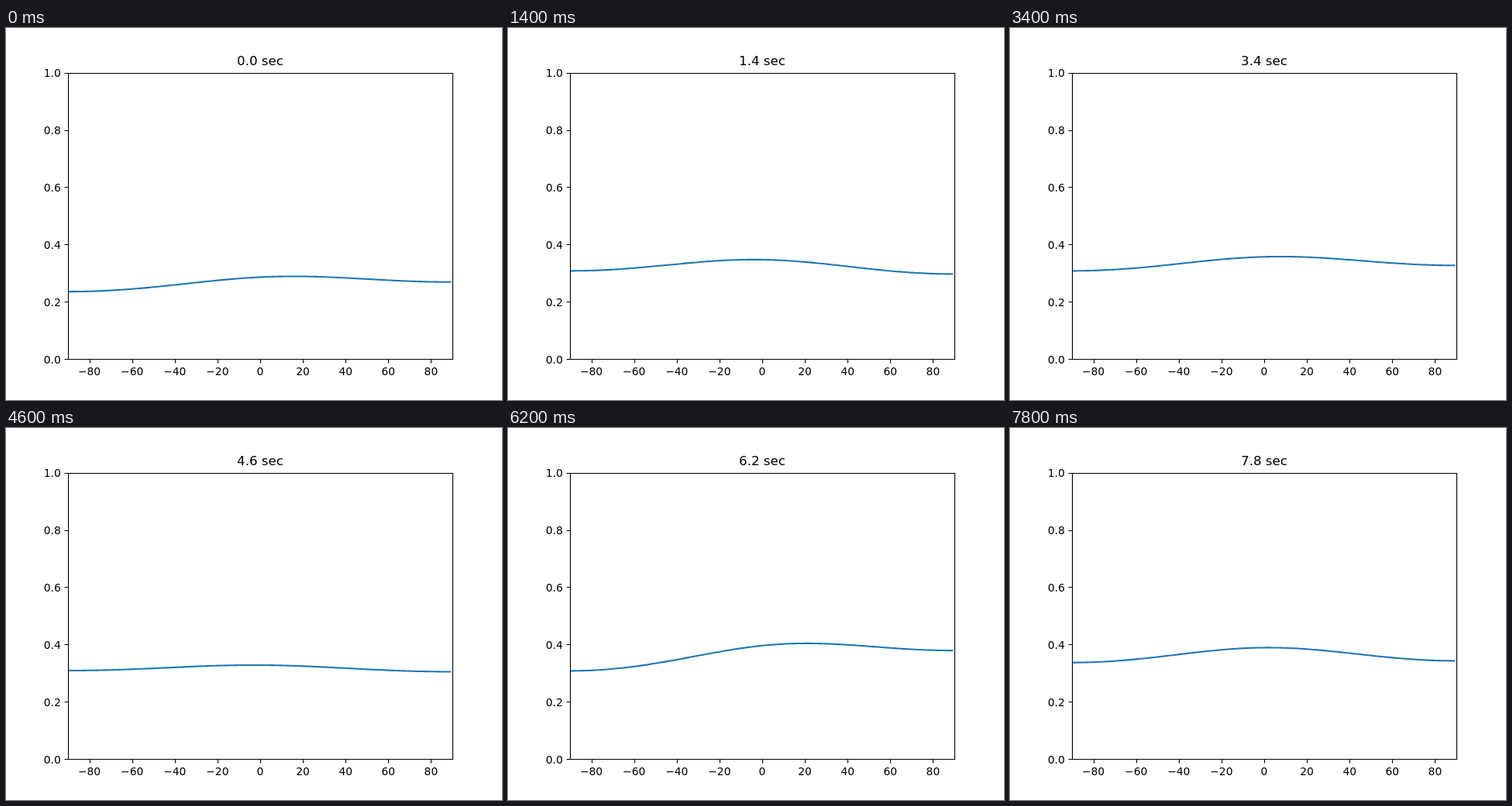
An HTML page with a canvas for the animation above (8000 ms loop, 640 by 480 pixels).

```html
<!DOCTYPE html>
<html lang="en">
<head>
<meta charset="utf-8">
<title>Curve over time</title>
<style>
  html, body { margin: 0; width: 100%; height: 100%; overflow: hidden; background: #fff; }
  canvas { display: block; }
</style>
</head>
<body>
<canvas id="plot" width="640" height="480"></canvas>
<script>
const ctx = document.getElementById('plot').getContext('2d');
const LOOP = 8000, STEP = 200;
const LEFT = 80, RIGHT = 576, TOP = 57.6, BOTTOM = 427.2;
const BEND = 1.1;

// Key poses: seconds, then the curve's height at its left end, middle and right end
const POSES = [
  [0, 0.2355, 0.286, 0.269],
  [1.4, 0.308, 0.347, 0.297],
  [2.6, 0.3285, 0.389, 0.341],
  [3.4, 0.308, 0.357, 0.327],
  [4.6, 0.309, 0.328, 0.305],
  [6.2, 0.308, 0.396, 0.379],
  [7.8, 0.337, 0.389, 0.343]
];

const toX = angle => LEFT + (angle + 90) / 180 * (RIGHT - LEFT);
const toY = value => BOTTOM - value * (BOTTOM - TOP);
const crisp = v => Math.round(v) + 0.5;

function poseAt(seconds) {
  const next = Math.max(1, POSES.findIndex(pose => pose[0] >= seconds));
  const [a, b] = [POSES[next - 1], POSES[next]];
  const mix = (seconds - a[0]) / (b[0] - a[0]);
  return a.map((v, k) => v + (b[k] - v) * mix).slice(1);
}

// A wave in sin(angle) through the three heights: a cosine bulge plus a sine tilt
function curve([left, middle, right]) {
  const bulge = (middle - (left + right) / 2) / (1 - Math.cos(BEND));
  const tilt = (right - left) / 2 / Math.sin(BEND);
  return angle => {
    const phase = BEND * Math.sin(angle * Math.PI / 180);
    return middle - bulge * (1 - Math.cos(phase)) + tilt * Math.sin(phase);
  };
}

function drawCurve(seconds) {
  const value = curve(poseAt(seconds));
  ctx.save();
  ctx.beginPath();
  ctx.rect(LEFT, TOP, RIGHT - LEFT, BOTTOM - TOP);
  ctx.clip();
  ctx.beginPath();
  for (let angle = -90; angle < 90; angle++) ctx.lineTo(toX(angle), toY(value(angle)));
  ctx.strokeStyle = '#1f77b4';
  ctx.lineWidth = 2.083;
  ctx.lineJoin = 'round';
  ctx.lineCap = 'square';
  ctx.stroke();
  ctx.restore();
}

function text(string, x, y, size, align) {
  ctx.font = `${size}px "DejaVu Sans", sans-serif`;
  ctx.textAlign = align;
  ctx.fillText(string, x, y);
}

function drawAxes() {
  const [x0, x1, y0, y1] = [LEFT, RIGHT, TOP, BOTTOM].map(crisp);
  ctx.strokeStyle = ctx.fillStyle = '#000';
  ctx.lineWidth = 1.111;
  ctx.beginPath();
  for (let angle = -80; angle <= 80; angle += 20) {
    const x = toX(angle);
    ctx.moveTo(crisp(x), y1);
    ctx.lineTo(crisp(x), y1 + 5);
    text(String(angle).replace('-', '\u2212'), x, 448, 13.889, 'center');
  }
  for (let i = 0; i <= 5; i++) {
    const y = toY(i / 5);
    ctx.moveTo(x0, crisp(y));
    ctx.lineTo(x0 - 5, crisp(y));
    text((i / 5).toFixed(1), 70.8, Math.ceil(y + 5), 13.889, 'right');
  }
  ctx.rect(x0, y0, x1 - x0, y1 - y0);
  ctx.stroke();
}

function draw() {
  const seconds = Math.floor(performance.now() % LOOP / STEP) * STEP / 1000;
  ctx.fillStyle = '#fff';
  ctx.fillRect(0, 0, 640, 480);
  drawCurve(seconds);
  drawAxes();
  text(`${seconds.toFixed(1)} sec`, 328, 48, 16.667, 'center');
  requestAnimationFrame(draw);
}
draw();
</script>
</body>
</html>
```
